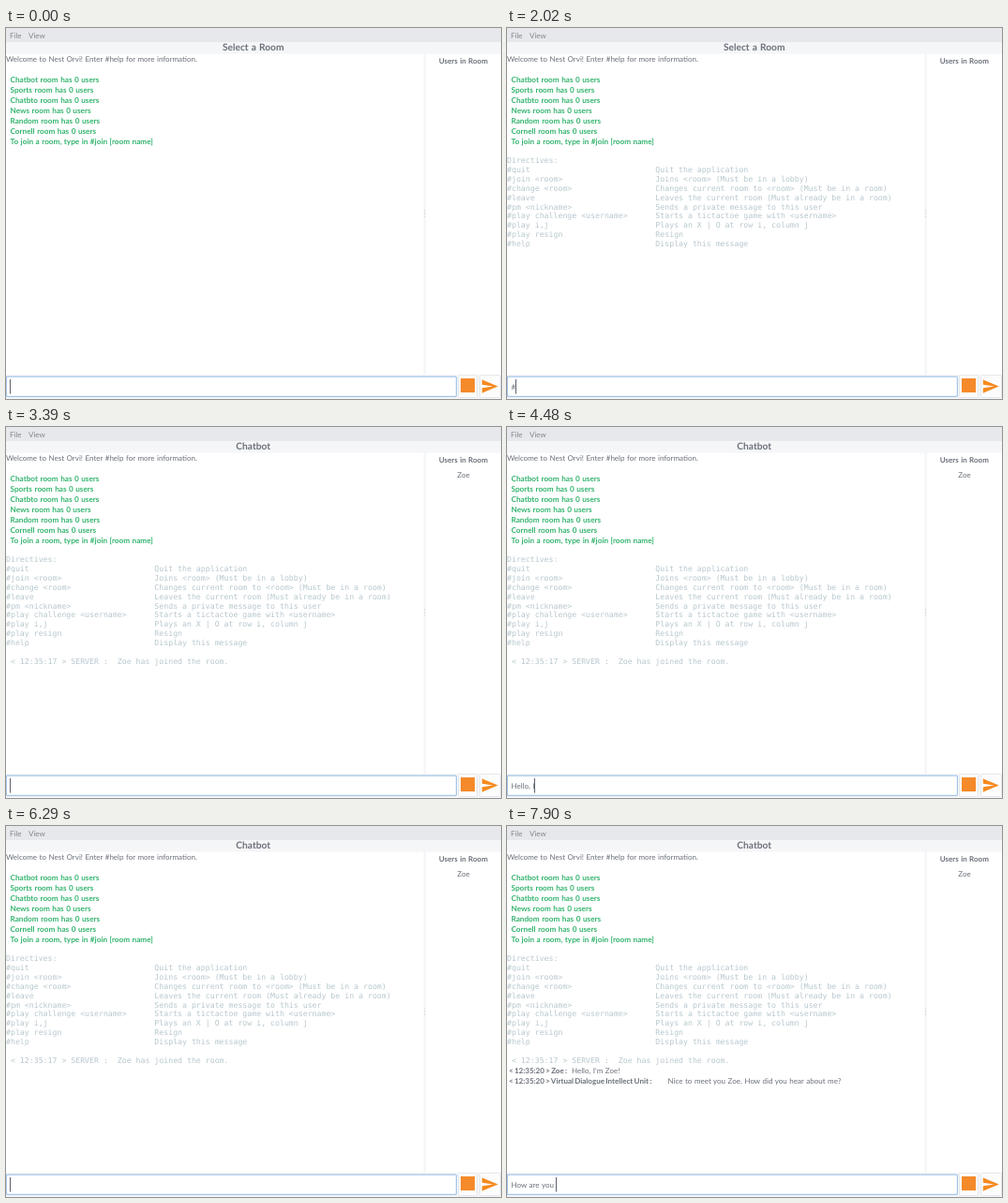
Recreate the animation shown at these times as an HTML page. Size 528 by 396 pixels, loop 8 s.

```html
<!DOCTYPE html>
<html lang="en">
<head>
<meta charset="utf-8">
<title>Chat client</title>
<style>
  html, body { margin: 0; width: 100%; height: 100%; overflow: hidden; background: #fff; }
  svg { display: block; width: 528px; height: 396px; text-rendering: geometricPrecision; }
  text { font: 8px Lato, "Open Sans", sans-serif; word-spacing: .06em; fill: #6b707a; white-space: pre; }
  .menu { fill: #81868e; }
  .title { font-size: 10.2px; font-weight: 700; text-anchor: middle; }
  .mid { text-anchor: middle; }
  .bold { font-weight: 700; }
  .name { font-weight: 700; word-spacing: -.08em; }
  .green { font-size: 8.2px; font-weight: 700; fill: #34b46f; }
  .mono { font: 8.22px "DejaVu Sans Mono", monospace; word-spacing: 0; fill: #b7c7ce; }
</style>
</head>
<body>
<svg id="stage" viewBox="0 0 528 396">
  <rect width="528" height="396" fill="#fff"/>
  <rect width="528" height="15" fill="#e7e8eb"/>
  <rect y="15" width="528" height="12.5" fill="#f5f6f7"/>
  <rect x="445.5" y="27" width="2.5" height="344" fill="#f5f6f7"/>
  <g fill="#c3c7cd">
    <rect x="446" y="194.5" width="1" height="1"/>
    <rect x="446" y="197.5" width="1" height="1"/>
    <rect x="446" y="200.5" width="1" height="1"/>
  </g>
  <rect y="370" width="528" height="26" fill="#f5f6f7"/>
  <rect x=".4" y="372.2" width="480" height="21.1" rx="1" fill="#fff" stroke="#a4c6ea" stroke-width="1.2"/>
  <g fill="#fcfcfd" stroke="#e4e7eb">
    <rect x="482.5" y="370.5" width="20" height="24" rx="1"/>
    <rect x="505.5" y="370.5" width="22" height="24" rx="1"/>
  </g>
  <rect x="485" y="374" width="15" height="15" fill="#f58a2a"/>
  <path d="M507.8 375.3L524.8 382.5L507.8 389.7V384.2L519.5 382.5L507.8 380.8Z" fill="#f58a1f"/>
</svg>
<script>
const LOOP = 8000;
const USER = "Zoe";
const BOT = "Virtual Dialogue Intellect Unit";
const stage = document.getElementById("stage");

function make(tag, attrs, parent = stage) {
  const el = document.createElementNS("http://www.w3.org/2000/svg", tag);
  for (const key in attrs) el.setAttribute(key, attrs[key]);
  return parent.appendChild(el);
}

function label(x, y, str, cls = "", parent = stage) {
  const el = make("text", { x, y, class: cls }, parent);
  el.textContent = str;
  return el;
}

function message(time, name, x, y, str, parent) {
  label(2, y, `< ${time} > ${name} :`, "name", parent);
  label(x, y, str, "", parent);
}

// Groups that appear at a given time
const groups = [];
function from(time) {
  const el = make("g", {});
  groups.push({ el, time });
  return el;
}

label(4, 10.8, "File", "menu");
label(24, 10.8, "View", "menu");
const title = label(263.7, 24.4, "", "title");
label(487.8, 38.4, "Users in Room", "bold mid");
label(0, 36, "Welcome to Nest Orvi! Enter #help for more information.");

const rooms = ["Chatbot", "Sports", "Chatbto", "News", "Random", "Cornell"];
rooms.forEach((room, i) => label(4.5, 58 + 11 * i, `${room} room has 0 users`, "green"));
label(4.5, 124, "To join a room, type in #join [room name]", "green");

const help = from(1000);
[
  ["Directives:", ""],
  ["#quit", "Quit the application"],
  ["#join <room>", "Joins <room> (Must be in a lobby)"],
  ["#change <room>", "Changes current room to <room> (Must be in a room)"],
  ["#leave", "Leaves the current room (Must already be in a room)"],
  ["#pm <nickname>", "Sends a private message to this user"],
  ["#play challenge <username>", "Starts a tictactoe game with <username>"],
  ["#play i,j", "Plays an X | O at row i, column j"],
  ["#play resign", "Resign"],
  ["#help", "Display this message"]
].forEach(([cmd, info], i) => label(0, 144 + 9.9 * i, cmd.padEnd(32) + info, "mono", help));

const joined = from(3390);
label(488, 54.3, USER, "mid", joined);
label(0, 252.9, ` < 12:35:17 > SERVER :  ${USER} has joined the room.`, "mono", joined);
message("12:35:20", USER, 69, 264, `Hello, I'm ${USER}!`, from(6350));
message("12:35:20", BOT, 171.5, 275, `Nice to meet you ${USER}. How did you hear about me?`, from(6560));

// Keystrokes spread evenly between two times; "\n" sends the line
const keys = [];
function type(start, end, str) {
  [...str].forEach((key, i) => {
    keys.push({ key, time: start + (end - start) * i / Math.max(1, str.length - 1) });
  });
}
type(340, 340, "#");
type(540, 750, "help");
type(1000, 1000, "\n");
type(2020, 2020, "#");
type(2190, 2500, "join ");
type(2650, 3180, "Chatbot");
type(3340, 3340, "\n");
type(3590, 3900, "Hell");
type(4110, 4110, "o");
type(4270, 4480, ", I");
type(4590, 4700, "'m");
type(4860, 4860, " ");
type(5200, 5200, USER[0]);
type(5350, 5420, USER.slice(1));
type(5700, 5700, "!");
type(6290, 6290, "\n");
type(6630, 6630, "H");
type(6890, 6890, "o");
type(7070, 7360, "w ar");
type(7420, 7730, "e you");
type(7900, 7900, " ");

const input = label(4.5, 386, "");
const caret = make("rect", { y: 375, width: 1, height: 15.5, fill: "#5c616c" });

function draw(t) {
  for (const { el, time } of groups) el.style.display = t >= time ? "" : "none";
  title.textContent = t >= 3390 ? "Chatbot" : "Select a Room";
  let line = "";
  for (const { key, time } of keys) {
    if (time <= t) line = key === "\n" ? "" : line + key;
  }
  input.textContent = line;
  const width = line ? input.getComputedTextLength() : 0;
  caret.setAttribute("x", Math.round(4 + width));
}

function tick() {
  draw(performance.now() % LOOP);
  requestAnimationFrame(tick);
}
tick();
</script>
</body>
</html>
```
